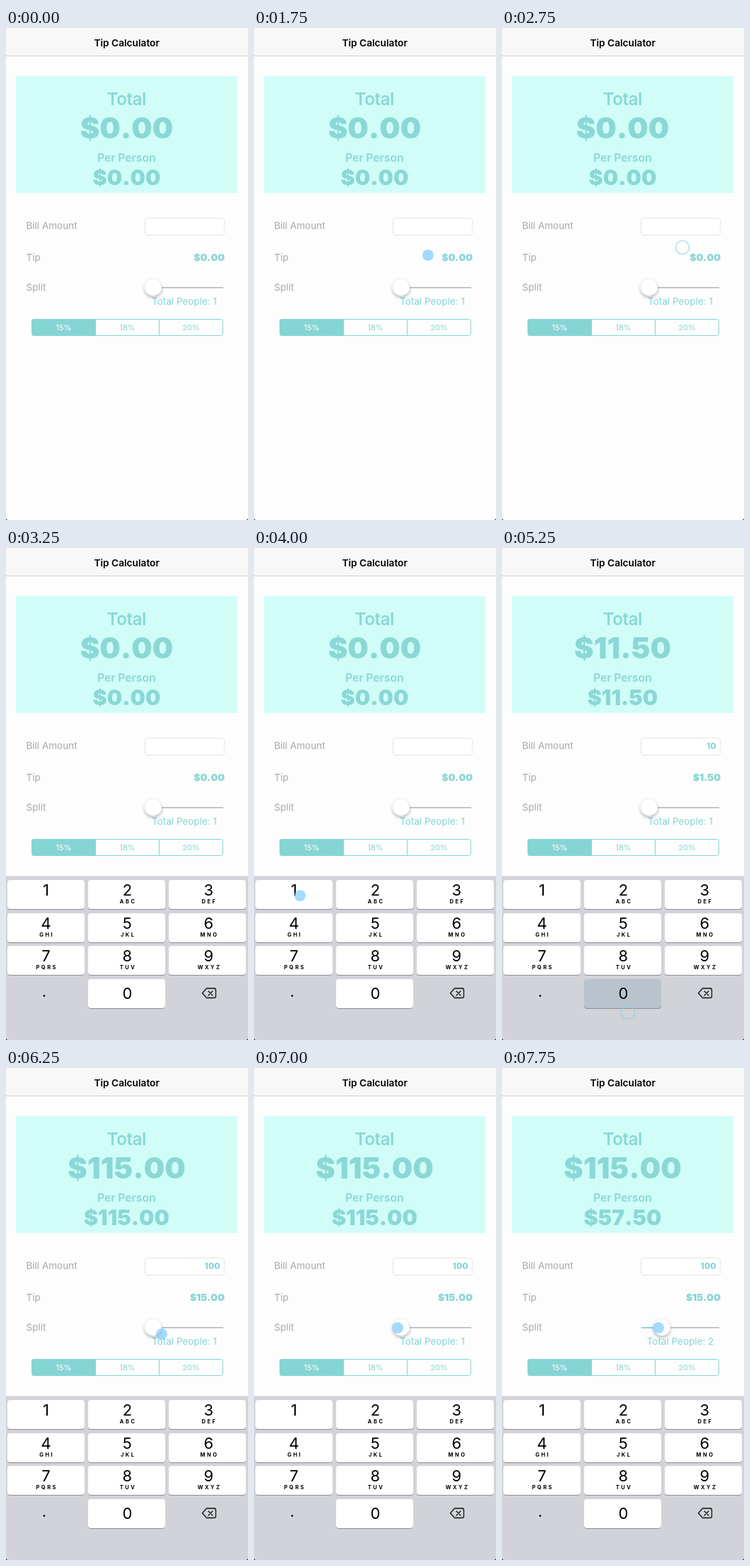
These frames come from a looping animation (342 px wide and 695 px high, 8 s). An HTML page:

```html
<!DOCTYPE html>
<html lang="en">
<head>
<meta charset="utf-8">
<title>Tip Calculator</title>
<style>
html, body { margin: 0; width: 100%; height: 100%; overflow: hidden; background: #fdfdfd; }
svg { display: block; width: 342px; height: 695px; font-family: Inter, Roboto, sans-serif; }
.mid { text-anchor: middle; }
.end { text-anchor: end; }
.teal { fill: #86d5d5; }
.panel { fill: #8ad8d6; }
.label { font-size: 13.5px; fill: #a8a8aa; }
.heavy { font-weight: 900; font-kerning: none; }
.seg { font-size: 11px; }
.digit { font-size: 22px; fill: #000; }
.letters { font-size: 7.5px; font-weight: 700; letter-spacing: 2.5px; fill: #000; }
</style>
</head>
<body>
<svg viewBox="0 0 342 695">
  <defs>
    <filter id="soft" x="-50%" y="-50%" width="200%" height="200%">
      <feDropShadow dx="0" dy="2.5" stdDeviation="2" flood-color="#000" flood-opacity=".28"/>
    </filter>
  </defs>
  <rect width="342" height="695" fill="#fdfdfd"/>
  <rect width="342" height="40" fill="#f8f8f8"/>
  <rect y="39" width="342" height="1" fill="#cbcbcd"/>
  <text class="mid" x="170.7" y="26" font-size="13.7" font-weight="600">Tip Calculator</text>

  <rect x="14" y="68" width="313" height="165" fill="#d1fdf8"/>
  <g class="mid panel">
    <text x="170.2" y="109" font-size="24.5" font-weight="600" letter-spacing="-.6">Total</text>
    <text id="total" class="heavy" x="170.5" y="156" font-size="41.5"></text>
    <text x="170.3" y="189" font-size="16" font-weight="600" letter-spacing="-.2">Per Person</text>
    <text id="each" class="heavy" x="170.5" y="222" font-size="30.2"></text>
  </g>

  <g class="label">
    <text x="28.5" y="284">Bill Amount</text>
    <text x="28.5" y="329">Tip</text>
    <text x="28.5" y="371">Split</text>
  </g>
  <rect x="196.5" y="268.5" width="112" height="24" rx="3.5" fill="#fff" stroke="#e4e4e6"/>
  <text id="bill" class="end teal" x="302.5" y="284" font-size="12" font-weight="800"></text>
  <text id="tip" class="end teal heavy" x="309" y="329" font-size="13.8"></text>

  <rect x="197" y="366" width="110" height="1.5" fill="#b3b1b4"/>
  <rect id="track" x="197" y="366" height="1.5" fill="#78d3d6"/>
  <text id="people" class="mid teal" x="252" y="391" font-size="13.5"></text>
  <circle id="knob" cy="366" r="12" fill="#fff" stroke="#e3e3e5" stroke-width=".5" filter="url(#soft)"/>

  <path class="teal" d="M126.5 411H39.5a3 3 0 0 0-3 3v18a3 3 0 0 0 3 3h87z"/>
  <rect x="36.5" y="411.5" width="270" height="23" rx="3" fill="none" stroke="#86d5d5"/>
  <path d="M126.5 411v24M216.5 411v24" stroke="#86d5d5"/>
  <g class="seg mid teal">
    <text x="81.5" y="427" style="fill:#fff">15%</text>
    <text x="171.5" y="427">18%</text>
    <text x="261.5" y="427">20%</text>
  </g>

  <g id="pad">
    <rect y="463.5" width="342" height="232" fill="#d1d3d9"/>
    <g id="keys"></g>
    <text class="digit mid" x="54" y="634">.</text>
    <g fill="none" stroke="#111" stroke-width="1.3" stroke-linecap="round" stroke-linejoin="round">
      <path d="M283.5 622H294a2.5 2.5 0 0 1 2.5 2.5v8.5a2.5 2.5 0 0 1-2.5 2.5H283.5L277.5 628.8z"/>
      <path d="M286 626l6 6M292 626l-6 6"/>
    </g>
  </g>

  <circle id="touch"/>
  <path d="M0 693v2h2zM342 693v2h-2z" fill="#333"/>
</svg>
<script>
const LOOP = 8000, TICK = 250;
const $ = id => document.getElementById(id);
const money = n => '$' + n.toFixed(2);
const set = (el, attrs) => Object.entries(attrs).forEach(([k, v]) => el.setAttribute(k, v));

const LETTERS = ['', 'ABC', 'DEF', 'GHI', 'JKL', 'MNO', 'PQRS', 'TUV', 'WXYZ'];
const caps = {};

function addKey(digit, col, row, letters) {
  const x = 2 + col * 114, y = Math.round(469 + row * 46.7);
  const cx = 56.5 + col * 114.9;
  const base = digit ? y + 21.8 : y + 28;
  $('keys').insertAdjacentHTML('beforeend',
    `<rect x="${x}" y="${y + 1}" width="109" height="41" rx="4" fill="#8d8f94"/>
     <rect id="key${digit}" x="${x}" y="${y}" width="109" height="41" rx="4"/>
     <text class="digit mid" x="${cx}" y="${base}">${digit}</text>
     <text class="letters mid" x="${cx + 1.25}" y="${y + 33.3}">${letters}</text>`);
  caps[digit] = $('key' + digit);
}
LETTERS.forEach((s, i) => addKey(i + 1, i % 3, Math.floor(i / 3), s));
addKey(0, 1, 3, '');

// Touch trail: time, x, y, and 1 when the finger lifts
const TRAIL = [
  [1000, 286, 373], [1250, 275, 358], [1500, 258, 338], [1750, 246, 321],
  [2000, 249, 313], [2250, 255, 310], [2500, 255, 310], [2750, 255, 310, 1],
  [3500, 70, 500], [3750, 66, 493], [4000, 65, 491], [4250, 65, 491, 1],
  [4500, 165, 652], [4750, 177, 656], [5000, 178, 656], [5250, 178, 656, 1],
  [5500, 178, 656], [5750, 178, 656, 1],
  [6250, 220, 376], [6500, 211, 371], [6750, 205, 368], [7000, 203, 367],
  [7250, 207, 367], [7500, 215, 367], [7750, 221, 367]
];

function drawTouch(t) {
  const p = TRAIL.find(q => q[0] === t);
  $('touch').style.display = p ? '' : 'none';
  if (!p) return;
  const [, x, y, lifted] = p;
  set($('touch'), {
    cx: x, cy: y, r: lifted ? 9.5 : 8,
    fill: lifted ? 'none' : 'rgba(115,200,250,.65)',
    stroke: lifted ? 'rgba(135,210,235,.5)' : 'none',
    'stroke-width': 2
  });
}

function draw(t) {
  const bill = t < 4250 ? 0 : t < 5000 ? 1 : t < 5500 ? 10 : 100;
  const people = t < 7500 ? 1 : 2;
  const knob = t < 7250 ? 208 : t < 7500 ? 212 : t < 7750 ? 220 : 226;
  const down = t === 4250 ? 1 : t >= 5000 && t < 5750 ? 0 : -1;
  const tip = bill * .15;

  $('total').textContent = money(bill + tip);
  $('each').textContent = money((bill + tip) / people);
  $('tip').textContent = money(tip);
  $('bill').textContent = bill || '';
  $('people').textContent = 'Total People: ' + people;
  set($('knob'), { cx: knob });
  set($('track'), { width: knob - 197 });

  const drop = t < 3000 ? 232 : t < 3250 ? 90 : 0;
  set($('pad'), { transform: `translate(0 ${drop})` });
  for (const d in caps) set(caps[d], { fill: +d === down ? '#b8c3cd' : '#fff' });
  drawTouch(t);
}

let last = -1;
const start = performance.now();
function frame() {
  const t = Math.floor((performance.now() - start) % LOOP / TICK) * TICK;
  if (t !== last) draw(last = t);
  requestAnimationFrame(frame);
}
frame();
</script>
</body>
</html>
```
